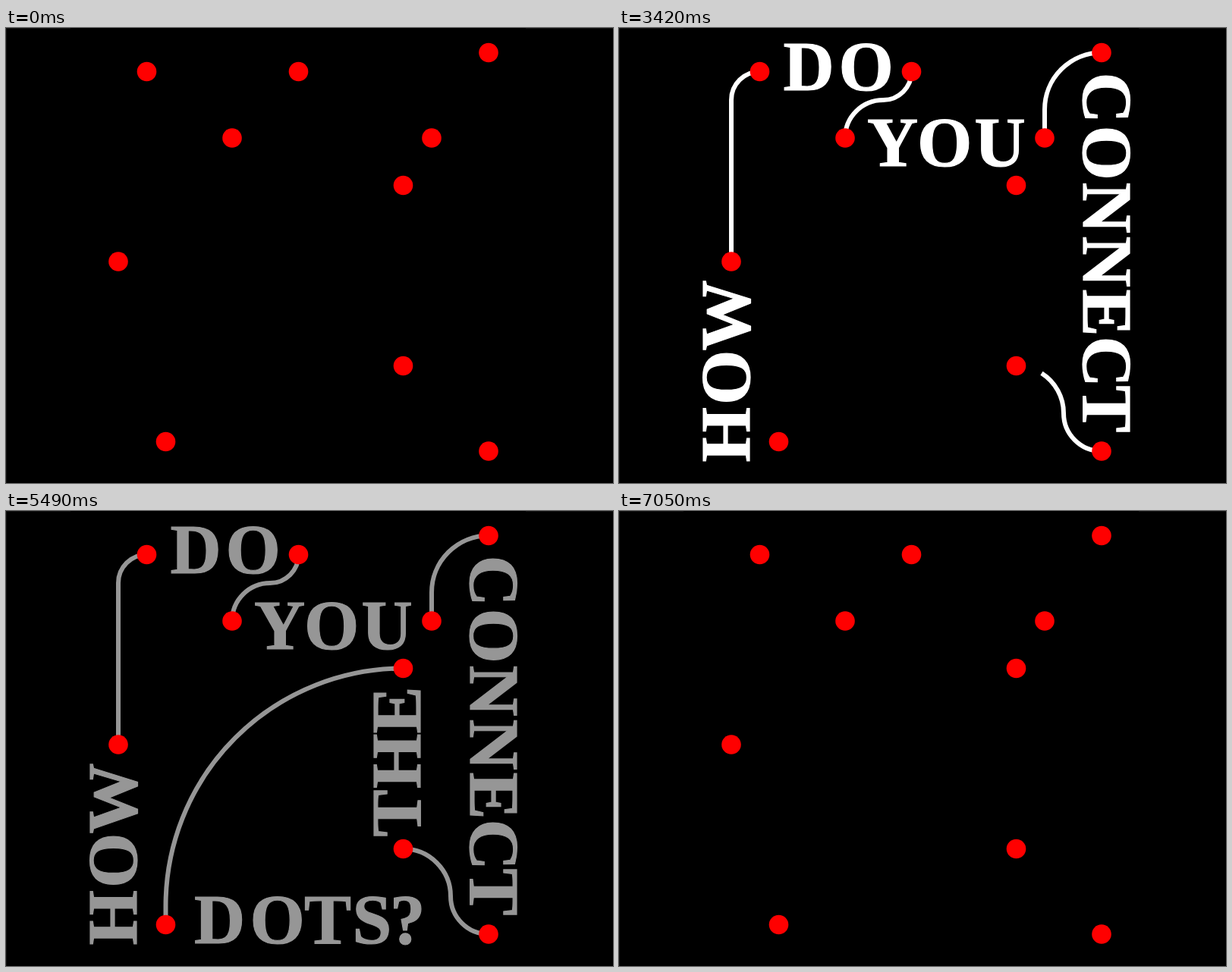
These frames come from a looping animation (800 px wide and 600 px high, 7200 ms). An HTML page:

```html
<!DOCTYPE html>
<html lang="en">
<head>
<meta charset="utf-8">
<title>How do you connect the dots?</title>
<style>
  html, body { margin: 0; width: 100%; height: 100%; overflow: hidden; background: #000; }
  svg { display: block; width: 100vw; height: 100vh; }
  text { font: bold 93px "Liberation Serif", "Times New Roman", serif; fill: #fff; stroke: #fff; stroke-width: 1.2; }
  path { fill: none; stroke: #fff; stroke-width: 6; }
  circle { fill: #f00; }
</style>
</head>
<body>
<svg viewBox="0 0 800 600">
  <path d="M0 .5H85M685 .5H800M.5 0V600" style="stroke:#121212;stroke-width:1"/>
  <g id="ink"></g>
  <g id="dots"></g>
</svg>
<script>
const LOOP = 7200, STEP = 30, LINE_TIME = 900;
const FADE_START = 4830, FADE_TIME = 2040;

// Origin and angle of each baseline, then the offset of each letter along it.
const words = [
  { text: "HOW",     x: 171.5, y: 572.5, angle: -90, offsets: [0, 75.5, 147] },
  { text: "DO",      x: 216.5, y: 81.5,  angle: 0,   offsets: [0, 73] },
  { text: "YOU",     x: 327,   y: 181.5, angle: 0,   offsets: [0, 66, 141.5] },
  { text: "CONNECT", x: 611.5, y: 58.5,  angle: 90,  offsets: [0, 70, 145, 216, 286, 348, 413] },
  { text: "THE",     x: 546,   y: 429.5, angle: -90, offsets: [0, 63.5, 136] },
  { text: "DOTS?",   x: 248,   y: 570,   angle: 0,   offsets: [0, 73.5, 145, 208.5, 258] }
];
const lines = [
  "M148 308V95A37.5 37.5 0 0 1 185.5 57.5",
  "M385.5 57.5A37.5 37.5 0 0 1 348 95A50 50 0 0 0 298 145",
  "M561 145V107.5A75 75 0 0 1 636 32.5",
  "M636 558A50 50 0 0 1 586 508A62.5 62.5 0 0 0 523.5 445.5",
  "M523.5 207.5A313 313 0 0 0 210.5 520.5V545.5"
];
const dots = [
  [148, 308], [185.5, 57.5], [385.5, 57.5], [298, 145], [561, 145],
  [636, 32.5], [636, 558], [523.5, 445.5], [523.5, 207.5], [210.5, 545.5]
];

const ink = document.getElementById("ink");
const clamp = v => Math.min(1, Math.max(0, v));

function add(parent, tag, attributes, content = "") {
  const node = document.createElementNS("http://www.w3.org/2000/svg", tag);
  for (const name in attributes) node.setAttribute(name, attributes[name]);
  node.textContent = content;
  return parent.appendChild(node);
}

const lineNodes = lines.map(d => add(ink, "path", { d, pathLength: 1 }));
const wordNodes = words.map(w => add(ink, "text", {
  x: w.offsets.join(" "),
  transform: `translate(${w.x} ${w.y}) rotate(${w.angle})`
}, w.text));
for (const [cx, cy] of dots) add(document.getElementById("dots"), "circle", { cx, cy, r: 12.8 });

function draw(now) {
  const t = Math.floor((now % LOOP) / STEP) * STEP;
  const isStarted = i => t > i * LINE_TIME;
  wordNodes.forEach((node, i) => node.style.display = isStarted(i) ? "" : "none");
  lineNodes.forEach((node, i) => {
    node.style.display = isStarted(i) ? "" : "none";
    const progress = clamp(t / LINE_TIME - i);
    node.style.strokeDasharray = progress < 1 ? `${progress} 2` : "none";
  });
  ink.style.opacity = (1 - clamp((t - FADE_START) / FADE_TIME)) ** 1.35;
}

const start = performance.now();
function tick() {
  draw(performance.now() - start);
  requestAnimationFrame(tick);
}
tick();
</script>
</body>
</html>
```
